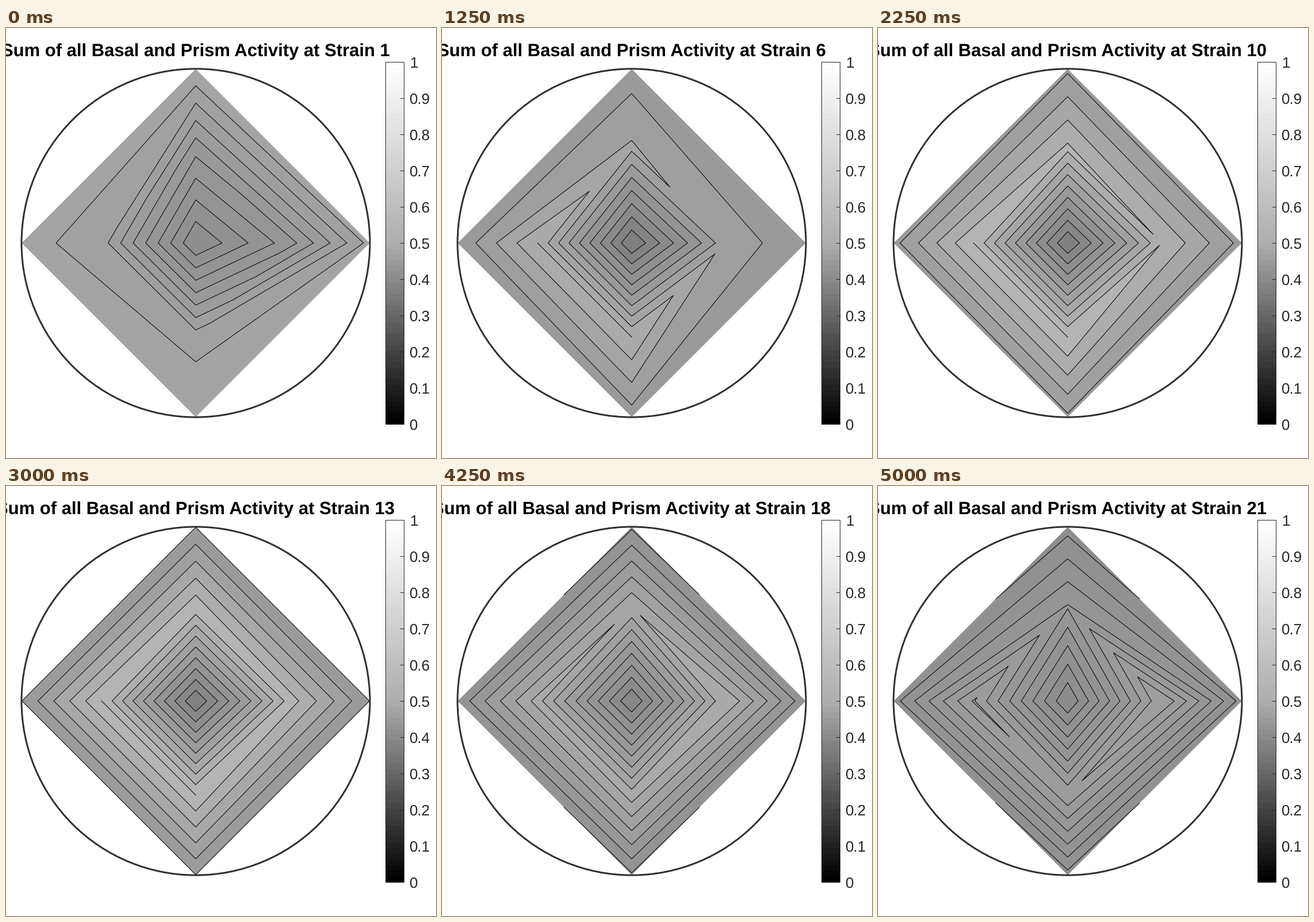
A matplotlib script for the animation above (5.25 s loop, 748 px wide and 748 px high).

```python
import numpy as np
import matplotlib.pyplot as plt
from matplotlib.animation import FuncAnimation
from matplotlib.patches import Circle, Polygon, Rectangle

SIZE, DPI, FRAMES = 748, 100, 21
PX = 72 / DPI
CX, CY, R = 330, 374, 302.5
RING = np.sqrt(2) * np.sin(np.pi / 8)  # equal-area radius of a 45 degree tilt
INK = "#262626"
PEAK = 9  # heights are counted in ninths of the value range

plt.rcParams["font.family"] = "Liberation Sans"
plt.rcParams["text.hinting"] = "none"

theta = np.arange(5) * np.pi / 2  # east, north, west, south, east
radii = R * np.array([0, RING, 1])
X = CX + np.outer(radii, np.cos(theta))
Y = CY - np.outer(radii, np.sin(theta))

fig = plt.figure(figsize=(SIZE / DPI, SIZE / DPI), dpi=DPI, facecolor="white")
ax = fig.add_axes([0, 0, 1, 1])
ax.axis("off")


def inner(s, start, tau, fall, power):
    """Hardens towards the peak, then softens after strain 14."""
    rise = 9.4 - (9.4 - start) * np.exp(-s / tau)
    return min(rise, PEAK) - fall * (max(s - 14, 0) / 6) ** power


def outer(s):
    """The rim sinks as a whole; the two axes swap order around strain 12."""
    mean = np.interp(s, [0, 3, 7, 12, 17, 20], [8.66, 5.38, 5.23, 3.99, 3.04, 2.08])
    split = 0.025 * max(12 - s, 0) - 0.0073 * max(s - 12, 0) ** 2
    return mean - split * np.cos(2 * theta)


def field(s):
    ring = [inner(s, 3.585, 6.4, 0, 1), inner(s, 4.36, 6.1, 3.9, 1.83),
            inner(s, 7.52, 1.8, 0.89, 0.64), inner(s, 7.57, 1.8, 1.18, 1.3)]
    return np.array([np.zeros(5), ring + ring[:1], outer(s)])


def greys(s):
    lo = np.interp(s, [0, 3, 14, 20], [142, 126, 130, 140])
    hi = np.interp(s, [0, 3, 7, 14, 20], [164, 161, 179, 181, 158])
    return [str(g / 255) for g in np.linspace(lo, hi, PEAK)]


def label(x, y, text, size, **kw):
    return ax.text(x, y, text, fontsize=size * PX, va="baseline", **kw)


def draw_colorbar(x0=660, x1=692, y0=59, y1=689):
    ramp = np.interp(np.linspace(0, 1, 64), [0, 0.5, 1], [0, 0.68, 1])
    ax.imshow(ramp[::-1, None], cmap="gray", vmin=0, vmax=1, aspect="auto",
              extent=(x0, x1, y1, y0), interpolation="nearest")
    ax.add_patch(Rectangle((x0, y0), x1 - x0, y1 - y0, fill=False,
                           ec=INK, lw=PX))
    for i in range(11):
        y = y1 + (y0 - y1) * i / 10
        ax.plot([x1 - 6, x1], [y, y], color=INK, lw=PX)
        label(702, y + 10, f"{i / 10:g}", 26, color=INK)


draw_colorbar()
base = ax.add_patch(Polygon(np.c_[X[2, :4], Y[2, :4]], lw=0, zorder=1))
ax.add_patch(Circle((CX, CY), 303, fill=False, ec="#303030", lw=3 * PX,
                    zorder=4))
ridge, = ax.plot(X[1, 2:4], Y[1, 2:4], color="black", lw=PX, zorder=3)
title = label(CX, 49, "", 31, ha="center", weight="bold", color="black")
ax.set(xlim=(0, SIZE), ylim=(SIZE, 0))

contours = []


def update(s):
    while contours:
        contours.pop().remove()
    z, shades = field(s), greys(s)
    base.set_facecolor(shades[int(z[2].mean())])
    contours.append(ax.contourf(X, Y, z, [-1, *range(1, PEAK), PEAK + 1],
                                colors=shades, antialiased=True, zorder=2))
    contours.append(ax.contour(X, Y, z, range(1, PEAK), colors="black",
                               linewidths=PX, zorder=3))
    # The top level is a line only where west and south share the peak.
    ridge.set_visible(bool(z[1, 2:4].min() >= PEAK))
    title.set_text(f"Sum of all Basal and Prism Activity at Strain {s + 1}")
    return []


anim = FuncAnimation(fig, update, frames=FRAMES, interval=250, repeat=True,
                     repeat_delay=0, blit=False)
plt.show()
```
